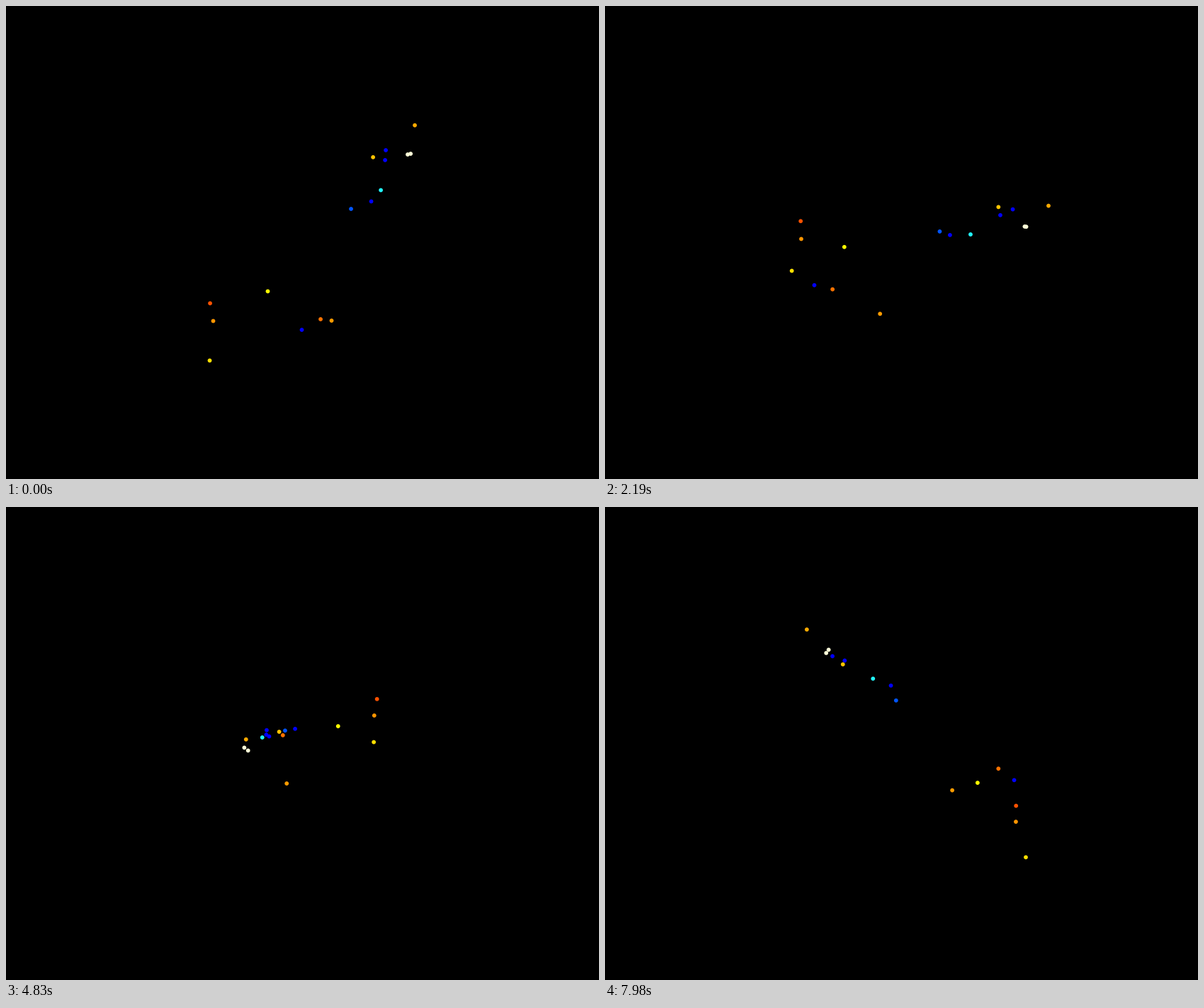
Animation, 837 px wide and 669 px high, one loop 8000 ms. Source, as a matplotlib script:

```python
import numpy as np
import matplotlib.pyplot as plt
from matplotlib.animation import FuncAnimation

W, H, DPI = 837, 669, 64
DOT = 5.8 * 72 / DPI             # dot diameter in points
FRAMES, INTERVAL = 400, 20       # 8 s loop

# Perspective camera: screen centre, eye distance (px) and elevation
CX, CY = 435.92, 330.88
DIST = 2784.5
ELEV = np.radians(30)

# Position in pixels: right, towards the viewer, up
STARS = [
    (102.0, -109.6, 86.0, "#0000ff"),
    (100.6, -92.3, 79.0, "#0000ff"),
    (79.6, -27.4, 47.1, "#0000ff"),
    (-17.8, 141.9, -60.0, "#0000ff"),
    (51.1, -21.8, 38.1, "#0055ff"),
    (93.8, -52.3, 51.7, "#22f8ff"),
    (134.1, -117.8, 74.8, "#ffffd8"),
    (138.1, -114.1, 77.9, "#ffffd8"),
    (-65.1, 84.5, -33.4, "#ffff00"),
    (-144.6, 144.8, -108.3, "#ffe000"),
    (83.4, -95.5, 82.0, "#ffc400"),
    (144.7, -144.7, 108.5, "#ffaa00"),
    (23.6, 57.4, -98.6, "#ff9c00"),
    (-139.0, 130.2, -53.1, "#ff9500"),
    (7.9, 122.0, -55.4, "#ff7300"),
    (-142.6, 129.3, -25.1, "#ff5200"),
]
RIGHT, NEAR, UP = np.array([s[:3] for s in STARS]).T
COLORS = [s[3] for s in STARS]


def project(angle):
    """Turn the cloud about its vertical axis and project it to the screen."""
    c, s = np.cos(angle), np.sin(angle)
    x = RIGHT * c - NEAR * s
    near = RIGHT * s + NEAR * c
    y = UP * np.cos(ELEV) - near * np.sin(ELEV)
    depth = near * np.cos(ELEV) + UP * np.sin(ELEV)
    zoom = 1 / (1 - depth / DIST)
    return np.column_stack([CX + x * zoom, CY - y * zoom])


fig = plt.figure(figsize=(W / DPI, H / DPI), dpi=DPI, facecolor="black")
ax = fig.add_axes([0, 0, 1, 1])
ax.axis("off")

# A collection keeps sub-pixel positions, so the dots glide smoothly
dots = ax.scatter(*project(0).T, s=DOT ** 2, c=COLORS, linewidths=0)
ax.set(xlim=(0, W), ylim=(H, 0))


def update(i):
    step = (2 * i + 1) // 3      # one degree every 30 ms
    dots.set_offsets(project(np.radians(step)))
    return [dots]


anim = FuncAnimation(fig, update, frames=FRAMES, interval=INTERVAL,
                     repeat=True, repeat_delay=0, blit=False)
plt.show()
```
